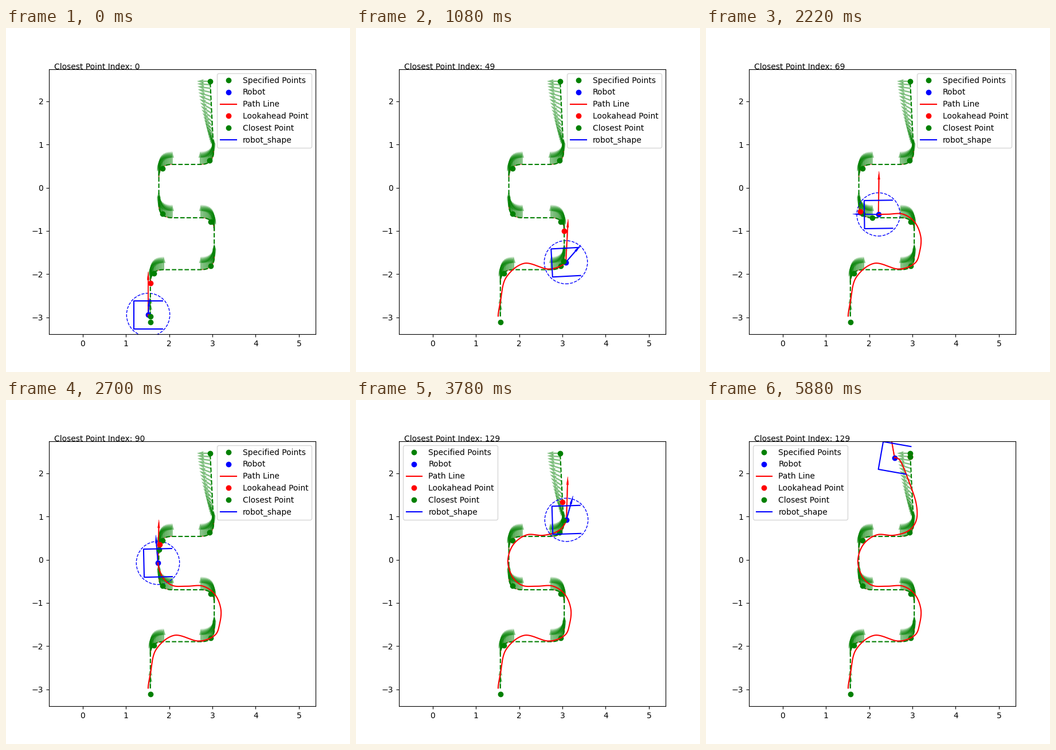
A matplotlib script for the animation above (6 s loop, 600 px wide and 600 px high).

```python
import numpy as np
import matplotlib.pyplot as plt
from matplotlib.animation import FuncAnimation

FRAMES, INTERVAL = 200, 30
XLIM, YLIM = (-.779, 5.387), (-3.387, 2.739)
RADIUS = .305                   # corner size, also heading arrow length
STEP = 7                        # frames between route points

# Planned path: a zigzag with rounded corners and a final run to the goal
XS, YS = (1.565, 3.043, 1.761, 3.028), (-2.977, -1.896, -.695, .538, 2.46)
knots = np.array([(x, y) for k, x in enumerate(XS) for y in YS[k:k + 2]])
START, GOAL = (1.565, -3.109), (2.948, 2.462)


def unit(v):
    return v / np.hypot(*v)


def round_corner(before, corner, after, n=20):
    """Quadratic Bezier around a corner, and the stop just inside it."""
    i, o = unit(corner - before), unit(after - corner)
    t = np.linspace(0, 1, n)[:, None]
    curve = corner + RADIUS * (t ** 2 * o - (1 - t) ** 2 * i)
    return curve, corner + .089 * (o - i)


turns = [round_corner(*knots[k:k + 3]) for k in range(len(knots) - 2)]
corners = [curve for curve, _ in turns]
stops = np.array([START, *(stop for _, stop in turns), GOAL])

lead = np.linspace(knots[0], knots[0] + (0, .146), 2)
u = np.linspace(0, 1, 21)[1:]
run = .3 * u + 1.45 * u ** 2 - .75 * u ** 3
exit_ = corners[-1][-1]
final = exit_ + run[:, None] * (GOAL - exit_)
path = np.vstack([lead, *corners, final])
angles = np.radians(np.r_[np.full(len(path) - len(u), 90), 95 + 85 * u])

# Driven route: positions at equal time steps
ROUTE = np.array([
    (1.515, -2.940), (1.565, -2.645), (1.691, -2.088), (2.118, -1.749),
    (2.673, -1.881), (3.049, -1.753), (3.166, -1.491), (3.195, -1.140),
    (3.057, -.801), (2.775, -.609), (2.417, -.613), (2.076, -.596),
    (1.840, -.390), (1.739, -.019), (1.866, .352), (2.178, .575),
    (2.562, .564), (2.911, .670), (3.093, .922), (3.086, 1.307),
    (2.927, 1.791), (2.735, 2.262), (2.611, 2.365), (2.592, 2.355),
    (2.589, 2.354),
])
SLOPE = np.gradient(ROUTE, axis=0, edge_order=2)


def drive(t):
    """Cubic Hermite position along the route."""
    s = np.minimum(np.atleast_1d(t) / STEP, len(ROUTE) - 1)
    i = np.clip(s.astype(int), 0, len(ROUTE) - 2)
    w = (s - i)[:, None]
    ease = w * w * (3 - 2 * w)
    return (ROUTE[i] + ease * (ROUTE[i + 1] - ROUTE[i])
            + w * (1 - w) ** 2 * SLOPE[i] - w * w * (1 - w) * SLOPE[i + 1])


def arrow(start, vec):
    """Outline of a slim arrow with a long head."""
    size = np.hypot(*vec)
    d = vec / size
    side = np.array([-d[1], d[0]])
    neck = size - .19
    outline = [(0, .011), (neck, .011), (neck, .024), (size, 0),
               (neck, -.024), (neck, -.011), (0, -.011)]
    return np.array([start + a * d + b * side for a, b in outline])


def heading(n):
    return np.radians(np.interp(n, [0, 36, 74, 105, 126, 147, 165],
                                [0, 3, .8, 1.8, 1.8, -9.6, -10]))


def reach(n):
    return np.interp(n, [139, 147, 160], [.5, .265, 0])


def index_label(n):
    steps = {0: 0, 24: 49, 47: 69, 79: 90, 111: 129}
    return max(v for k, v in steps.items() if n >= k)


fig, ax = plt.subplots(figsize=(6, 6), dpi=100)
ax.quiver(*path.T, RADIUS * np.cos(angles), RADIUS * np.sin(angles),
          color="green", alpha=.5, angles="xy", scale_units="xy", scale=1)
for curve in corners:
    ax.plot(*curve.T, color="red", lw=.8, alpha=.6)
ax.plot(*path.T, "g--")
ax.plot(*stops.T, "go", label="Specified Points")
robot, = ax.plot([], [], "bo", label="Robot")
trail, = ax.plot([], [], "r-", label="Path Line")
ahead, = ax.plot([], [], "ro", label="Lookahead Point")
closest, = ax.plot([], [], "go", label="Closest Point")
body, = ax.plot([], [], "b-", label="robot_shape")
ring = ax.add_patch(plt.Circle((0, 0), .5, fill=False, ec="blue", ls="--", lw=1))
facing, = ax.fill([0] * 7, [0] * 7, color="red", lw=.3)
motion, = ax.fill([0] * 7, [0] * 7, color="blue", lw=.3)
caption = ax.text(.02, 1, "", transform=ax.transAxes)
legend = ax.legend(loc="upper right")
ax.set(xlim=XLIM, ylim=YLIM, xticks=range(6), yticks=range(-3, 3))

SQUARE = .325 * np.array([(1, 1), (-1, 1), (-1, -1), (1, -1)])


def update(n):
    pos = drive(n)[0]
    vel = (drive(n + .1) - drive(n - .1))[0] / .2
    speed = np.hypot(*vel)
    r = reach(n)
    c, s = np.cos(heading(n)), np.sin(heading(n))

    dist = np.hypot(*(path - pos).T)
    near = dist.argmin()
    beyond = np.flatnonzero(dist[near:] >= .84 * r)
    target = near + beyond[0] if len(beyond) else len(path) - 1
    for dot, p in (robot, pos), (closest, path[near]), (ahead, path[target]):
        dot.set_data(p[:1], p[1:])

    trail.set_data(*drive(np.append(np.arange(-1.5, n, .25), n)).T)
    body.set_data(*(pos + SQUARE @ np.array([(c, s), (-s, c)])).T)
    ring.center, ring.radius = pos, r
    ring.set_visible(r > 0)
    facing.set_xy(arrow(pos, np.array([s, c])))
    motion.set_visible(speed > .002)
    if speed > .002:
        motion.set_xy(arrow(pos, unit(vel) * (8 * speed + .2)))

    caption.set_text(f"Closest Point Index: {index_label(n)}")
    legend.set_loc("upper right" if n < 116 else "upper left")
    return robot, trail, ahead, closest, body, ring, facing, motion, caption, legend


anim = FuncAnimation(fig, update, frames=FRAMES, interval=INTERVAL,
                     repeat=True, repeat_delay=0)
plt.show()
```
